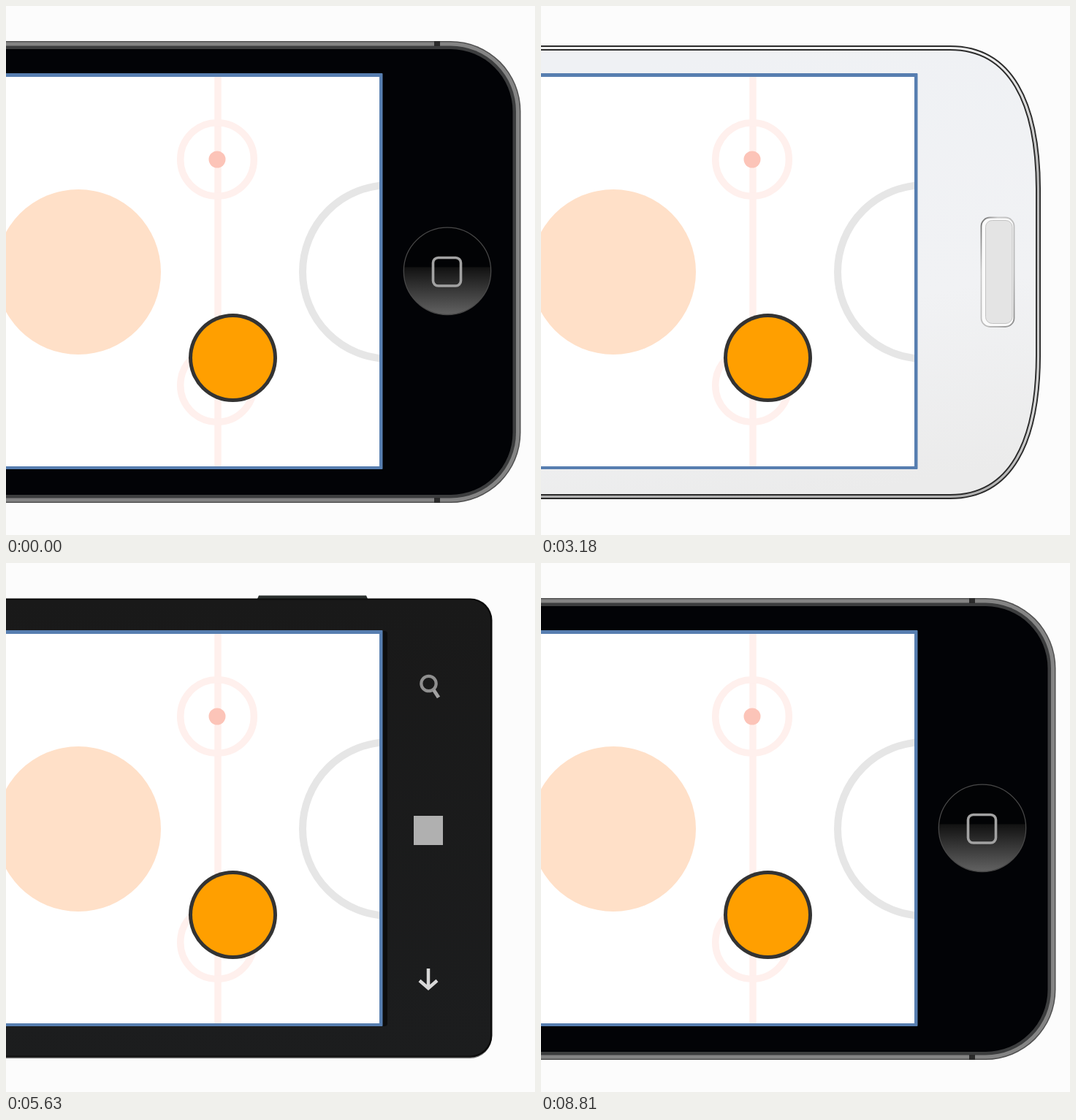
An HTML page that plays this animation: 724x724 px, repeating every 8.84 s.

```html
<!DOCTYPE html>
<html lang="en">
<head>
<meta charset="utf-8">
<title>One game, three phones</title>
<style>
  html, body { margin: 0; width: 100%; height: 100%; overflow: hidden; background: #fcfcfc; }
  svg { display: block; }
</style>
</head>
<body>
<svg width="724" height="724" viewBox="0 0 724 724" fill="none">
  <defs>
    <linearGradient id="homeFill" x2="0" y2="1">
      <stop offset=".45" stop-color="#020305"/>
      <stop offset=".46" stop-color="#121212"/>
      <stop offset="1" stop-color="#626262"/>
    </linearGradient>
    <linearGradient id="silverFill" x1=".4" x2=".6" y2="1">
      <stop stop-color="#eff1f4"/>
      <stop offset=".6" stop-color="#f1f2f4"/>
      <stop offset="1" stop-color="#ebebeb"/>
    </linearGradient>
    <linearGradient id="silverRim" x2="0" y2="1">
      <stop stop-color="#f0f0f0"/>
      <stop offset=".3" stop-color="#b8b8b8"/>
      <stop offset=".8" stop-color="#d8d8d8"/>
      <stop offset="1" stop-color="#b0b0b0"/>
    </linearGradient>
    <linearGradient id="keyRim" x2="1" y2="1">
      <stop stop-color="#6c6c6c"/>
      <stop offset=".25" stop-color="#c8c8c8"/>
      <stop offset=".75" stop-color="#b4b4b4"/>
      <stop offset="1" stop-color="#8a8a8a"/>
    </linearGradient>
    <linearGradient id="matteFill" x2="0" y2="1">
      <stop stop-color="#191919"/>
      <stop offset="1" stop-color="#1c1d1e"/>
    </linearGradient>
    <path id="silverBody" d="M-20 57.5H560C643 57.5 680 132 680.5 250V479C680 597 643 671.5 560 671.5H-20Z"/>
  </defs>

  <g id="glossy">
    <rect x="-200" y="48" width="904.5" height="632" rx="96" fill="#505050"/>
    <rect x="-200" y="49.5" width="903" height="629" rx="94.5" fill="#848484"/>
    <rect x="-200" y="54.5" width="898" height="619" rx="89.5" fill="#3c3d3e"/>
    <rect x="-200" y="59" width="893.5" height="610" rx="85" fill="#020306"/>
    <path d="M586 48h8v7h-8zM586 673h8v7h-8z" fill="#2b2b2b"/>
    <circle cx="604" cy="362.8" r="59.7" fill="url(#homeFill)" stroke="#484848" stroke-width="1.3"/>
    <rect x="584.5" y="344.5" width="38" height="38.5" rx="7" stroke="#a2a2a2" stroke-width="3.6"/>
  </g>

  <g id="silver">
    <use href="#silverBody" fill="url(#silverFill)" stroke="#2b2b2b" stroke-width="7"/>
    <use href="#silverBody" stroke="url(#silverRim)" stroke-width="3.2"/>
    <rect x="602.5" y="289.5" width="45" height="149.5" rx="12" fill="#fafafa" stroke="url(#keyRim)" stroke-width="1.8"/>
    <rect x="608.5" y="293.5" width="36.5" height="141" rx="9" fill="#e4e4e4" stroke="#c4c4c4"/>
  </g>

  <g id="matte">
    <path d="M344 49l2-4.5h147l2 4.5z" fill="#2b302e"/>
    <rect x="-50" y="50" width="715" height="628" rx="30" fill="#777"/>
    <rect x="-50" y="48.5" width="715.5" height="628" rx="30" fill="#0c0c0c"/>
    <rect x="-50" y="50.5" width="713" height="624" rx="28" fill="url(#matteFill)"/>
    <rect x="-10" y="93" width="532" height="541" rx="4" fill="#0d0d0d"/>
    <circle cx="578.5" cy="165" r="10.2" stroke="#8f8f8f" stroke-width="4.2"/>
    <path d="M585.5 174l6.5 10" stroke="#a2a2a2" stroke-width="5"/>
    <rect x="558" y="346" width="40" height="40" fill="#b0b0b0"/>
    <path d="M578 555v27M566 571.5l12 10.5 12-10.5" stroke="#d8d8d8" stroke-width="4.5"/>
  </g>

  <rect x="-10" y="92" width="525.5" height="542" rx="1" fill="#577eb0"/>
  <svg width="511" height="630">
    <rect y="97" width="511" height="533" fill="#fff"/>
    <g stroke="#fff0ed" stroke-width="9.5">
      <path d="M290 97V630"/>
      <circle cx="289" cy="210" r="50.3"/>
      <circle cx="289" cy="519" r="50.3"/>
    </g>
    <circle cx="289" cy="210" r="11.5" fill="#fcc4b8"/>
    <circle cx="525" cy="364" r="119" stroke="#e6e6e6" stroke-width="10"/>
    <circle cx="99" cy="364" r="113" fill="#ffe0c8"/>
    <circle cx="310.5" cy="481.5" r="60.5" fill="#333"/>
    <circle cx="310.5" cy="481.5" r="55.5" fill="#ff9f00"/>
  </svg>
</svg>
<script>
  const LOOP = 8840, STEP = 30, STEPS = 7;
  const [glossy, silver, matte] = ["glossy", "silver", "matte"].map(id => document.getElementById(id));
  const show = (layer, alpha) => layer.setAttribute("opacity", alpha);

  // Stepped crossfade: the first step is visible at the start time itself.
  const fade = (t, start) =>
    Math.min(STEPS, Math.max(0, Math.floor((t - start) / STEP) + 1)) / STEPS;

  function draw(now) {
    const t = now % LOOP;
    const toSilver = fade(t, 3000), toMatte = fade(t, 5450), toGlossy = fade(t, 8630);
    show(glossy, 1 - toSilver + toGlossy);
    show(silver, toSilver - toMatte);
    show(matte, toMatte - toGlossy);
  }

  const begin = performance.now();
  function tick() {
    draw(performance.now() - begin);
    requestAnimationFrame(tick);
  }
  tick();
</script>
</body>
</html>
```
